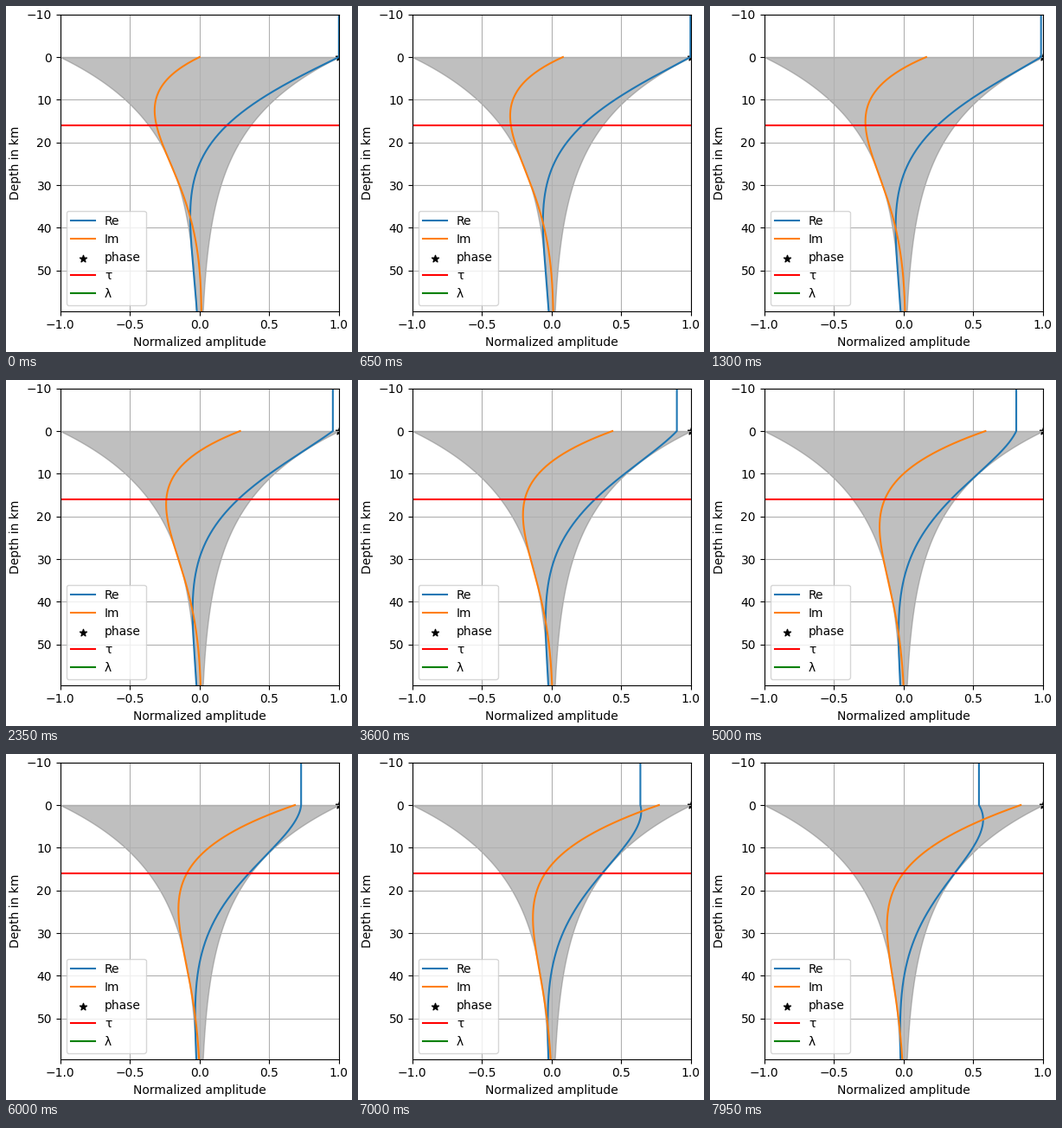
A matplotlib script for the animation above (8 s loop, 400 px wide and 400 px high).

```python
import numpy as np
import matplotlib.pyplot as plt
from matplotlib.animation import FuncAnimation

FRAMES = 160
INTERVAL = 50
STEP = 2 * np.pi / 1000      # phase advance per frame
SKIN = 503.29 * np.sqrt(100 * 10) / 1000   # skin depth in km
Z_TOP, Z_MAX = -10, 59.5

depth = np.arange(0, Z_MAX + 0.25, 0.25)
decay = np.exp(-depth / SKIN)


def field(phase):
    return decay * np.exp(1j * (phase - depth / SKIN))


fig, ax = plt.subplots(figsize=(4, 4), dpi=100, layout="constrained")

ax.fill_betweenx(depth, -decay, decay, color="gray", alpha=0.5)
re_line, = ax.plot([], [], color="C0", label="Re")
im_line, = ax.plot([], [], color="C1", label="Im")
ax.scatter(1, 0, marker="*", color="k", label="phase")
ax.axhline(SKIN, color="r", label="τ")
ax.axhline(2 * np.pi * SKIN, color="g", label="λ")

ax.set_xlim(-1, 1)
ax.set_ylim(Z_MAX, Z_TOP)
ax.set_xlabel("Normalized amplitude")
ax.set_ylabel("Depth in km")
ax.grid()
ax.legend(loc="lower left")


def update(i):
    wave = field(i * STEP)
    # above the surface the real part stays constant
    re_line.set_data(np.r_[wave.real[0], wave.real], np.r_[Z_TOP, depth])
    im_line.set_data(wave.imag, depth)
    return re_line, im_line


update(0)
fig.draw_without_rendering()
fig.set_layout_engine("none")

anim = FuncAnimation(fig, update, frames=FRAMES, interval=INTERVAL,
                     repeat=True, repeat_delay=0)
plt.show()
```
